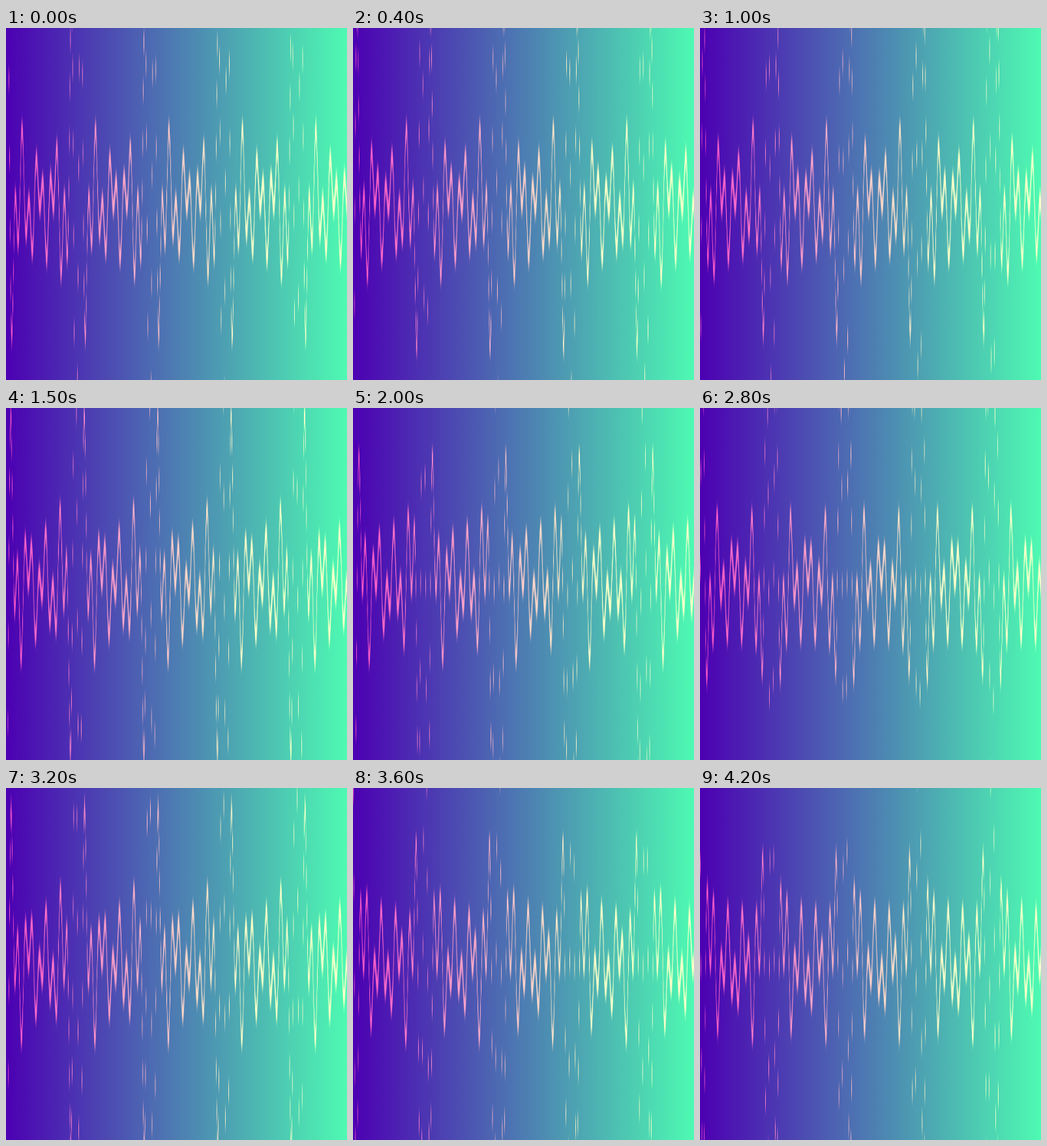
An HTML page with a canvas for the animation above (4.3 s loop, 523 by 541 pixels).

```html
<!DOCTYPE html>
<html lang="en">
<head>
<meta charset="utf-8">
<title>Harmonic waves</title>
<style>
  html, body { margin: 0; height: 100%; overflow: hidden; background: #4d00b3; }
  canvas { display: block; width: 523px; height: 541px; }
</style>
</head>
<body>
<canvas width="627" height="541"></canvas>
<script>
const canvas = document.querySelector('canvas');
const ctx = canvas.getContext('2d');
const { width, height } = canvas;

const LOOP = 4300, STEP = 100;   // ms
const STEP_PHASE = 1.094;        // radians per step
const START_PHASE = -0.722;
const PERIOD = 135.067;          // columns per repeat
const ORIGIN = 131.1;            // column where all harmonics line up
const AMPLITUDE = 81;
const HALF_LINE = 27;

const background = ctx.createLinearGradient(0, 0, width, 0);
background.addColorStop(0, 'rgb(76,0,178)');
background.addColorStop(1, 'rgb(78,250,178)');

// Soft vertical profile of the line, added to the background
const glow = ctx.createLinearGradient(0, -HALF_LINE, 0, HALF_LINE);
for (let i = 0; i <= 16; i++) {
  const d = 1 - Math.abs(i / 8 - 1);
  glow.addColorStop(i / 16, `rgba(205,90,26,${d * d * (3 - 2 * d)})`);
}

function wave(column, phase) {
  const x = 2 * Math.PI * (column - ORIGIN) / PERIOD;
  let sum = 0;
  for (let n = 5; n <= 10; n++) sum += Math.sin(n * x + phase);
  return AMPLITUDE * sum;
}

function draw(step) {
  const phase = START_PHASE + step * STEP_PHASE;
  ctx.globalCompositeOperation = 'source-over';
  ctx.fillStyle = background;
  ctx.fillRect(0, 0, width, height);

  ctx.globalCompositeOperation = 'lighter';
  ctx.fillStyle = glow;
  for (let column = 0; column < width; column++) {
    ctx.setTransform(1, 0, 0, 1, column, height / 2 - wave(column + 0.5, phase));
    ctx.fillRect(0, -HALF_LINE, 1, 2 * HALF_LINE);
  }
  ctx.resetTransform();
}

const start = performance.now();
function tick() {
  draw(Math.floor((performance.now() - start) % LOOP / STEP));
  requestAnimationFrame(tick);
}
tick();
</script>
</body>
</html>
```
